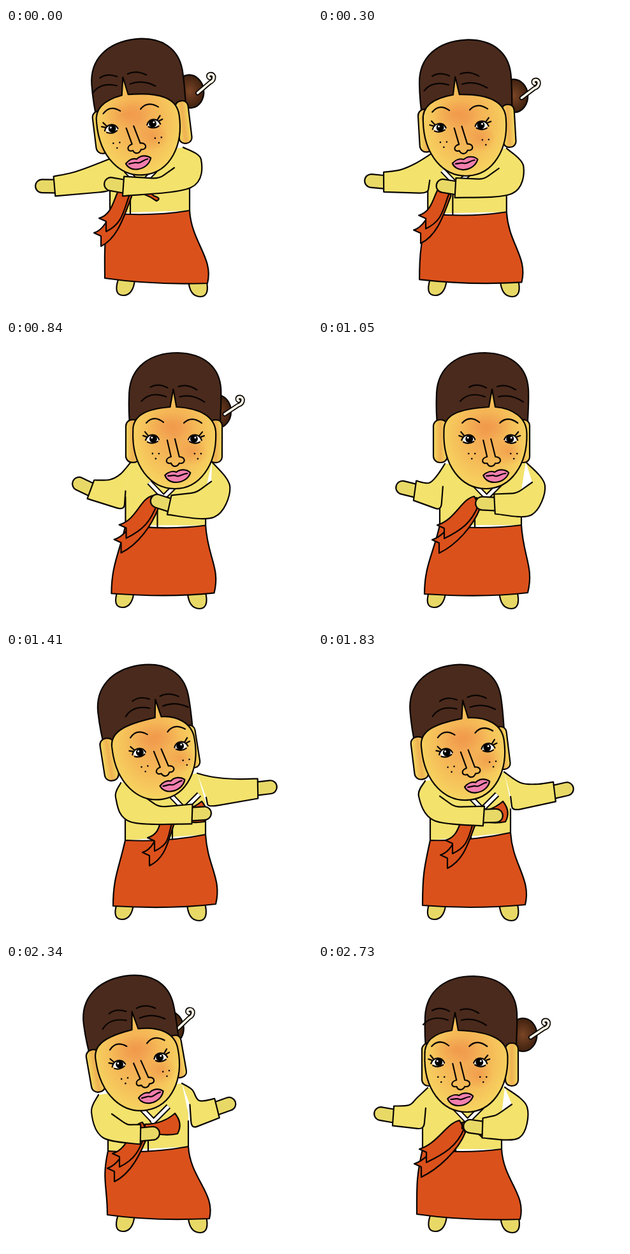
An HTML page that plays this animation: 480 px wide and 445 px high, repeating every 2760 ms.

```html
<!DOCTYPE html>
<html lang="en">
<head>
<meta charset="utf-8">
<title>Dance</title>
<style>
html, body { margin: 0; width: 100%; height: 100%; overflow: hidden; background: #fff; }
svg { display: block; width: 100%; height: 100%; }
.ink { stroke: #080402; stroke-width: 2.2; stroke-linejoin: round; stroke-linecap: round; }
.line { fill: none; }
.cloth { fill: #f3e26c; }
.skin { fill: #e8d967; }
.red { fill: #db511b; }
.hair { fill: #4a2a1c; }
.ear { fill: url(#earTone); }
</style>
</head>
<body>
<svg id="stage" viewBox="0 0 480 445">
  <defs>
    <radialGradient id="faceTone" cx=".5" cy=".45" r=".62">
      <stop offset="0" stop-color="#f3a552"/>
      <stop offset=".45" stop-color="#f5b957"/>
      <stop offset="1" stop-color="#f7dc63"/>
    </radialGradient>
    <radialGradient id="blush">
      <stop offset="0" stop-color="#ee8a45" stop-opacity=".55"/>
      <stop offset="1" stop-color="#ee8a45" stop-opacity="0"/>
    </radialGradient>
    <linearGradient id="earTone">
      <stop offset="0" stop-color="#f3d95f"/>
      <stop offset=".5" stop-color="#efb152"/>
      <stop offset="1" stop-color="#f3d95f"/>
    </linearGradient>
    <radialGradient id="bunTone">
      <stop offset="0" stop-color="#7a4526"/>
      <stop offset="1" stop-color="#40210f"/>
    </radialGradient>
    <path id="pin" d="M12,4L33,-10C41,-12 43,-22 36,-23C31,-23 31,-18 34,-17"/>
    <g id="eye">
      <path fill="#fff" d="M-10,1C-6,-8 6,-8 10,1C5,8 -5,8 -10,1"/>
      <circle r="6" cx="1"/>
      <circle r="1.5" cx="-1" cy="-2" fill="#fff"/>
      <path class="ink line" d="M-11,2C-7,-9 6,-9 10,1M-9,-3L-15,-5M-7,-5L-12,-11M-8,5Q0,9 8,4"/>
    </g>
  </defs>
  <g id="feet">
    <path class="ink skin" d="M176,394C171,410 173,419 184,419C196,419 201,407 202,394Z"/>
    <path class="ink skin" d="M286,394C287,412 294,421 305,421C316,421 318,410 314,394Z"/>
  </g>
  <path id="torso" class="cloth"/>
  <path id="sides" class="ink line"/>
  <path id="skirt" class="ink red"/>
  <g id="collar" fill="none">
    <path stroke="#080402" stroke-width="9" d="M-22,-18L2,7M24,-18L-3,9"/>
    <path stroke="#fff" stroke-width="5" d="M-22,-18L1,6M24,-18L-2,8"/>
  </g>
  <path id="front" class="ink line"/>
  <path id="tailB" class="ink red"/>
  <path id="tailA" class="ink red"/>
  <path id="loop" class="ink red"/>
  <g id="arms"></g>
  <g id="head">
    <g id="bun">
      <ellipse class="ink" style="fill:url(#bunTone)" rx="22" ry="26"/>
      <use href="#pin" fill="none" stroke="#080402" stroke-width="7" stroke-linecap="round"/>
      <use href="#pin" fill="none" stroke="#fff8e6" stroke-width="3.6" stroke-linecap="round"/>
    </g>
    <path class="ink hair" d="M-70,18C-72,0 -73,-20 -72,-42C-70,-82 -40,-105 4,-105C46,-104 70,-82 72,-48C73,-25 71,0 70,18Z"/>
    <rect class="ink ear" x="-77" y="0" width="22" height="67" rx="10"/>
    <rect class="ink ear" x="54" y="0" width="20" height="67" rx="9"/>
    <path id="face" class="ink" fill="url(#faceTone)"/>
    <path id="part" class="ink line" d="M-50,-29Q-36,-45 -11,-36M-36,-51Q-24,-58 -9,-50M8,-52Q22,-57 37,-47M10,-36Q30,-41 49,-28"/>
    <g id="look">
      <ellipse fill="url(#blush)" cx="-4" cy="10" rx="38" ry="22"/>
      <ellipse fill="url(#blush)" cx="30" cy="50" rx="24" ry="22"/>
      <use href="#eye" x="-33" y="30"/>
      <use href="#eye" transform="translate(33,30) scale(-1,1)"/>
      <path class="ink line" d="M-43,5Q-31,-8 -16,4M16,5Q28,-7 44,5"/>
      <path class="ink line" d="M-10,32L-4,58C-14,60 -13,70 -4,68C-1,75 6,74 9,68C19,70 20,58 9,58L2,30"/>
      <g id="freckles"></g>
    </g>
    <g id="mouth">
      <path class="ink" fill="#f27fae" d="M-20,-1C-14,-7 -7,-8 -2,-6C4,-11 14,-11 20,-5C17,4 8,10 -3,10C-12,10 -18,5 -20,-1Z"/>
      <path class="ink line" d="M-15,0C-8,0 -5,-2 -2,0C3,2 8,-4 15,-4"/>
    </g>
  </g>
</svg>
<script>
const LOOP = 2760, STEP = 30, CUFF = 15.5, HAND = 31;
const $ = id => document.getElementById(id);

// Each key: time, then values.
const headKeys = [ // x, y, tilt, turn
  [0, 211, 122, -7, -22],
  [600, 255, 125, 0, -9],
  [780, 265, 125, 0, -7],
  [1050, 258, 125, 0, 15],
  [1410, 222, 125, -9, 20],
  [1830, 221, 125, -7, 12],
  [2340, 200, 123, -10, 6],
  [2730, 240, 124, 0, -25]
];
const skirtKeys = [ // waist left, waist right, hem left, hem right
  [0, 163, 290, 288, 286, 155, 392, 316, 400],
  [600, 181, 291, 304, 290, 163, 396, 323, 397],
  [1050, 191, 290, 319, 290, 167, 398, 329, 396],
  [1410, 187, 295, 313, 286, 168, 398, 329, 395],
  [1830, 176, 295, 302, 283, 164, 397, 325, 396],
  [2340, 160, 293, 286, 286, 159, 393, 319, 399],
  [2730, 164, 290, 288, 290, 155, 392, 317, 400]
];
const bowKeys = [ // knot, tail tip, loop tip, loop half height, collar x, seam x
  [0, 192, 252, 146, 298, 240, 267, 4, 210, 195],
  [600, 217, 250, 170, 290, 224, 252, 6, 228, 227],
  [1050, 249, 252, 187, 290, 256, 254, 7, 264, 246],
  [1410, 260, 254, 222, 291, 315, 250, 16, 279, 261],
  [1830, 243, 255, 200, 295, 298, 250, 16, 257, 240],
  [2340, 218, 255, 167, 297, 273, 250, 16, 231, 223],
  [2730, 226, 252, 159, 290, 262, 266, 6, 234, 216]
];
// Arm: neck, shoulder, elbow, wrist, hand angle, inner bend
const leftKeys = [
  [0, 168, 203, 140, 214, 106, 226, 76, 248, 175, 162, 256],
  [600, 186, 193, 166, 211, 150, 220, 128, 236, 184, 182, 262],
  [1050, 199, 194, 187, 212, 174, 224, 152, 236, 188, 193, 267],
  [1410, 180, 205, 172, 228, 195, 266, 292, 254, 2, 240, 243],
  [1830, 168, 202, 158, 226, 182, 264, 260, 257, 4, 215, 243],
  [2340, 145, 205, 134, 232, 152, 272, 211, 267, 1, 190, 252],
  [2730, 172, 194, 155, 210, 143, 221, 118, 238, 184, 166, 259]
];
const rightKeys = [
  [0, 278, 187, 306, 206, 290, 250, 184, 248, 184, 240, 236],
  [600, 312, 190, 338, 226, 318, 268, 245, 253, 182, 280, 238],
  [1050, 326, 191, 356, 228, 335, 274, 277, 257, 177, 312, 240],
  [1410, 300, 190, 325, 196, 360, 199, 395, 214, -1, 317, 243],
  [1830, 292, 188, 318, 205, 345, 207, 371, 219, -7, 305, 249],
  [2340, 276, 187, 292, 197, 303, 214, 331, 226, -14, 291, 258],
  [2730, 293, 193, 328, 224, 316, 272, 258, 257, 182, 280, 237]
];

// Smooth cubic interpolation through the keys
function sample(keys, t) {
  const last = keys.length - 1;
  let i = 0;
  while (i < last - 1 && t >= keys[i + 1][0]) i++;
  const a = keys[i], b = keys[i + 1], span = b[0] - a[0];
  const u = Math.min(1, (t - a[0]) / span);
  const before = keys[Math.max(0, i - 1)], after = keys[Math.min(last, i + 2)];
  return a.slice(1).map((p, k) => {
    const q = b[k + 1], d = q - p;
    const m = (q - before[k + 1]) / (b[0] - before[0]) * span;
    const n = (after[k + 1] - p) / (after[0] - a[0]) * span;
    return p + u * (m + u * (3 * d - 2 * m - n + u * (m + n - 2 * d)));
  });
}

const mix = (a, b, k) => [a[0] + (b[0] - a[0]) * k, a[1] + (b[1] - a[1]) * k];
const pairs = v => Array.from({ length: v.length >> 1 }, (_, i) => [v[2 * i], v[2 * i + 1]]);
const set = (id, d) => $(id).setAttribute('d', d);
const move = (id, x, y) => $(id).setAttribute('transform', `translate(${x},${y})`);

function curve(pts) {
  let d = 'M' + pts[0];
  for (let i = 0; i < pts.length - 1; i++) {
    const a = pts[i], b = pts[i + 1], p = pts[i - 1] || a, q = pts[i + 2] || b;
    d += `C${a[0] + (b[0] - p[0]) / 6},${a[1] + (b[1] - p[1]) / 6} ` +
         `${b[0] - (q[0] - a[0]) / 6},${b[1] - (q[1] - a[1]) / 6} ${b}`;
  }
  return d;
}

function make(parent, tag, attrs) {
  const el = document.createElementNS('http://www.w3.org/2000/svg', tag);
  for (const k in attrs) el.setAttribute(k, attrs[k]);
  return parent.appendChild(el);
}

function makeArm() {
  const round = { fill: 'none', 'stroke-linecap': 'round' };
  return [
    make($('arms'), 'path', { ...round, stroke: '#080402', 'stroke-width': 23 }),
    make($('arms'), 'path', { ...round, stroke: '#e8d967', 'stroke-width': 18.6 }),
    make($('arms'), 'path', { class: 'ink cloth' })
  ];
}
const leftArm = makeArm(), rightArm = makeArm();

for (const side of [-1, 1])
  for (const [x, y] of [[-5, 53], [5, 53], [0, 61]])
    make($('freckles'), 'circle', { cx: side * 33 + x + 5, cy: y, r: 1.3 });

// side is 1 for the arm on the left of the stage, -1 for the other
function drawArm([edge, fill, sleeve], v, side) {
  const [neck, shoulder, elbow, wrist] = pairs(v.slice(0, 8));
  const [deg, bx, by] = v.slice(8), bend = [bx, by];
  const c = Math.cos(deg * Math.PI / 180), s = Math.sin(deg * Math.PI / 180);
  const cuff = k => [wrist[0] - k * side * CUFF * s, wrist[1] + k * side * CUFF * c];
  const reach = (1 - side * c) / 2;
  const lift = Math.max(6, 62 - .6 * Math.abs(bx - wrist[0]));
  const end = [bx + side * (27 * reach - 24), by - 17 * (1 - reach) - lift * reach];
  const tip = HAND - 11.5;
  const hand = `M${wrist}L${wrist[0] + tip * c},${wrist[1] + tip * s - 2}`;
  edge.setAttribute('d', hand);
  fill.setAttribute('d', hand);
  sleeve.setAttribute('d', curve([neck, shoulder, elbow, cuff(1)]) +
    `L${cuff(-1)}L${mix(cuff(-1), bend, .8)}Q${bend} ${mix(bend, end, .3)}L${end}`);
}

function drawTail(id, kx, ky, x, y) {
  set(id, `M${kx - 4},${ky - 7}C${kx - 24},${ky - 3} ${x + 28},${y - 8} ${x},${y}` +
    `L${x + 11},${y + 5}L${x + 11},${y + 21}C${x + 38},${y + 8} ${kx - 8},${ky + 34} ${kx + 3},${ky + 6}Z`);
}

function drawBody(t) {
  const [wl, wr, hl, hr] = pairs(sample(skirtKeys, t));
  const left = sample(leftKeys, t), right = sample(rightKeys, t);
  const [kx, ky, tx, ty, lx, ly, h, cx, fx] = sample(bowKeys, t);
  const midX = (wl[0] + wr[0]) / 2, midY = (wl[1] + wr[1]) / 2 + 8;

  move('feet', -1 + Math.cos(2 * Math.PI * t / LOOP), 0);
  set('torso', `M${left.slice(0, 2)}L${right.slice(0, 2)}L${wr[0]},235L${wr}L${wl}L${wl[0]},235Z`);
  set('sides', `M${wl[0]},246L${wl}M${wr[0]},246L${wr}`);
  set('skirt', `M${wl}Q${midX},${midY} ${wr}` +
    `C${wr[0] + 3},${wr[1] + 50} ${hr[0] + 10},${hr[1] - 40} ${hr}` +
    `Q${midX + 6},${(hl[1] + hr[1]) / 2 + 7} ${hl}` +
    `C${hl[0]},${hl[1] - 45} ${wl[0] - 10},${wl[1] + 45} ${wl}Z`);
  move('collar', cx, 241);
  set('front', `M${cx - 3},250Q${fx},257 ${fx},267L${fx},${midY - 5}`);
  drawTail('tailB', kx + 2, ky + 6, tx - 8, ty + 23);
  drawTail('tailA', kx, ky, tx, ty);
  set('loop', `M${kx},${ky - 4}Q${(kx + lx) / 2},${ky - 4} ${lx - 8},${ly - h}` +
    `Q${lx + 5},${ly} ${lx - 4},${ly + h}Q${(kx + lx) / 2},${ky + h} ${kx},${ky + 6}Z`);
  drawArm(leftArm, left, 1);
  drawArm(rightArm, right, -1);
}

function drawHead(t) {
  const [x, y, tilt, turn] = sample(headKeys, t);
  const c = turn * .3, eyes = turn * .75;
  $('head').setAttribute('transform', `translate(${x},${y}) rotate(${tilt})`);
  move('bun', 64 - turn * .7 - Math.max(0, turn - 6) * 6, -13);
  set('face', `M${c - 65},18C${c - 66},-8 ${c - 42},-17 ${turn - 5},-20L${turn},-48L${turn + 5},-20` +
    `C${c + 42},-18 ${c + 65},-4 ${c + 65},22C${c + 66},70 ${c + 40},108 ${c + 1},108` +
    `C${c - 38},108 ${c - 67},72 ${c - 65},18Z`);
  move('part', turn, 0);
  move('look', eyes, 0);
  move('mouth', eyes + 7 + turn * .2, 88);
}

const start = performance.now();
function frame(now) {
  const t = Math.floor(Math.max(0, now - start) % LOOP / STEP) * STEP;
  drawBody(t);
  drawHead(t);
  requestAnimationFrame(frame);
}
frame(start);
</script>
</body>
</html>
```
